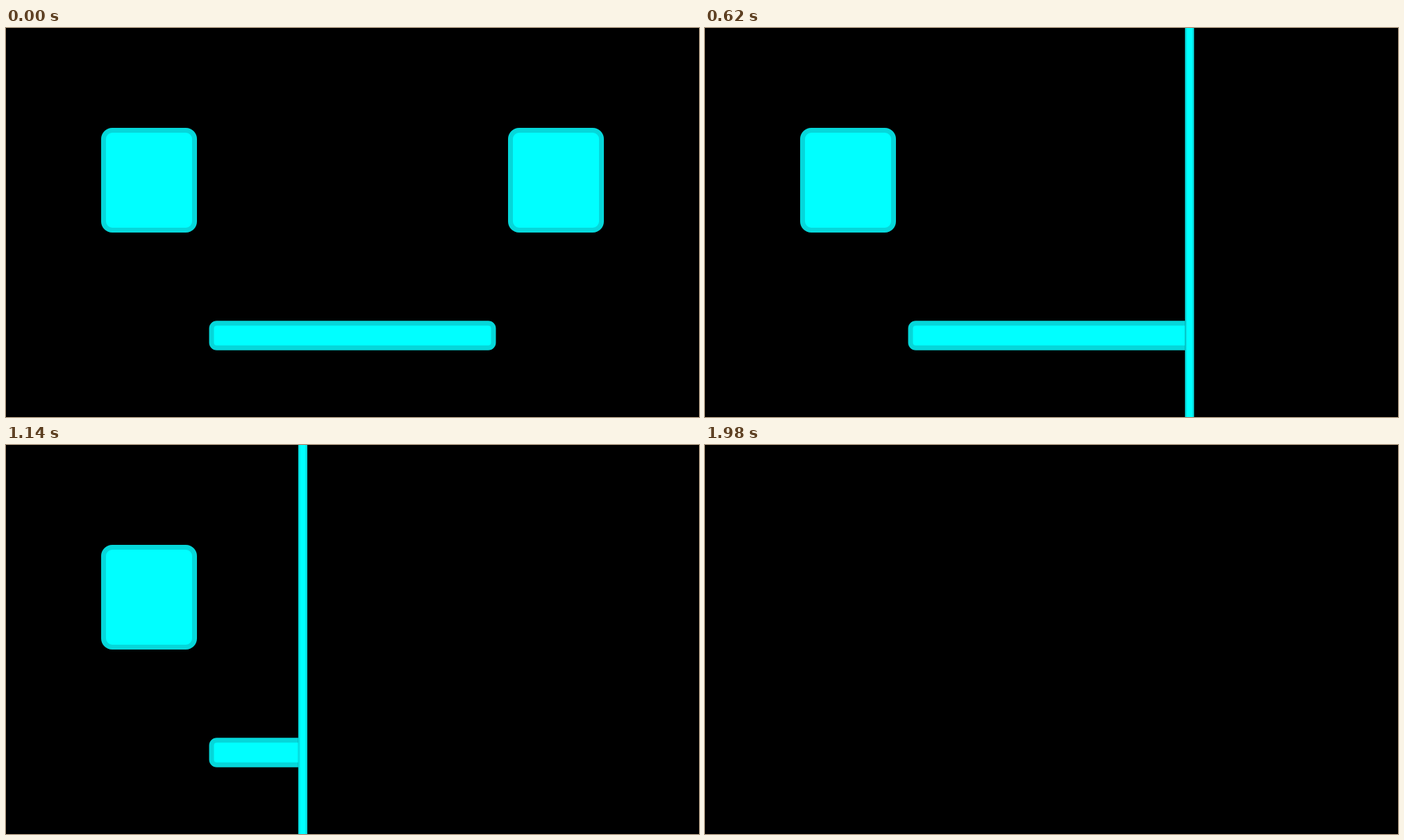
These frames come from a looping animation (998x561 px, 2 s). An HTML page:

```html
<!DOCTYPE html>
<html lang="en">
<head>
<meta charset="utf-8">
<title>Face wipe</title>
<style>
  html, body { margin: 0; width: 100%; height: 100%; overflow: hidden; background: #000; }
  svg { display: block; }
  .box { fill: #0ff; stroke: #06d7da; stroke-width: 7; }
</style>
</head>
<body>
<svg width="998" height="561" viewBox="0 0 998 561">
  <rect class="box" x="140.5" y="147.5" width="131" height="144" rx="12.5"/>
  <rect class="box" x="726.5" y="147.5" width="131" height="144" rx="12.5"/>
  <rect class="box" x="296" y="425.7" width="406" height="35.6" rx="7.5"/>
  <g id="wipe">
    <rect width="1040" height="561" fill="#000"/>
    <rect width="13" height="561" fill="#06dfe2"/>
    <rect x="2.5" width="8" height="561" fill="#0ff"/>
  </g>
</svg>
<script>
  const LOOP = 2000, STEP = 20, START_X = 1013.7, SPEED = 0.52;
  const wipe = document.getElementById('wipe');
  const start = performance.now();

  function draw() {
    const elapsed = (performance.now() - start) % LOOP;
    const time = Math.floor(elapsed / STEP) * STEP;
    wipe.setAttribute('transform', `translate(${START_X - SPEED * time} 0)`);
    requestAnimationFrame(draw);
  }
  draw();
</script>
</body>
</html>
```
